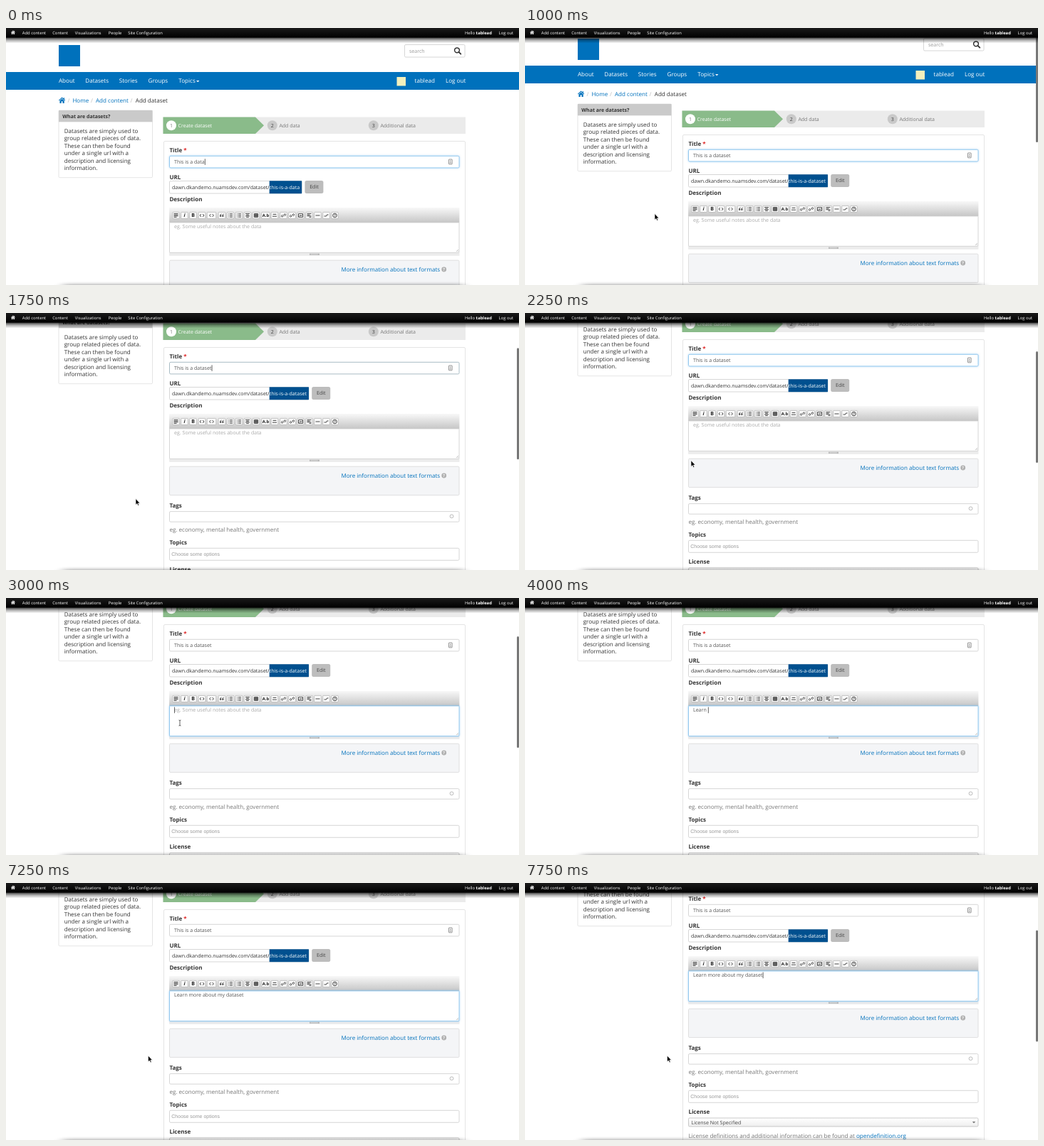
An HTML page that plays this animation: 720x362 px, repeating every 8000 ms.

```html
<!DOCTYPE html>
<html lang="en">
<head>
<meta charset="utf-8">
<title>Add dataset</title>
<style>
html, body { margin: 0; width: 100%; height: 100%; overflow: hidden; background: #fff; }
svg { display: block; width: 100vw; height: 100vh; }
text { font-family: "Open Sans", sans-serif; white-space: pre; text-rendering: geometricPrecision; }
.glow { filter: drop-shadow(0 0 1.6px rgba(102, 175, 233, .5)); }
</style>
</head>
<body>
<svg id="stage" viewBox="0 0 720 362" xmlns="http://www.w3.org/2000/svg"></svg>
<script>
const BLUE = '#0071bc', DARK = '#333', BORDER = '#ccc', GLOW = '#7bbdeb';
const BIG = 8.07, SMALL = 7.05;
const stage = document.getElementById('stage');

const attrs = o => Object.entries(o).map(([k, v]) => ` ${k}="${v}"`).join('');
const rect = (x, y, w, h, fill, more = {}) =>
  `<rect x="${x}" y="${y}" width="${w}" height="${h}" fill="${fill}"${attrs(more)}/>`;
const box = (x, y, w, h, fill = '#fff', stroke = BORDER, more = {}) =>
  rect(x, y, w, h, fill, { stroke, 'stroke-width': 0.8, rx: 1.5, ...more });
const text = (x, y, size, fill, str, more = {}) =>
  `<text x="${x}" y="${y}" font-size="${size}" fill="${fill}"${attrs(more)}>${str}</text>`;
const path = (d, fill = 'none', more = {}) => `<path d="${d}" fill="${fill}"${attrs(more)}/>`;
const circle = (x, y, r, fill, more = {}) =>
  `<circle cx="${x}" cy="${y}" r="${r}" fill="${fill}"${attrs(more)}/>`;
const bold = { 'font-weight': 700 };
const mid = { 'text-anchor': 'middle' };
const label = (y, str) => text(229.4, y, 8, DARK, str, bold);
const house = (x, y, k, fill) =>
  path('M0 4.6L5 0L7.4 2.2V.8H8.7V3.4L10 4.6L9.3 5.3L5 1.5L.7 5.3ZM1.6 5.4L5 2.4L8.4 5.4V9H6V6.2H4V9H1.6Z',
    fill, { transform: `translate(${x} ${y}) scale(${k})` });

function header() {
  const nav = [[74, 'About'], [111.3, 'Datasets'], [158.8, 'Stories'], [199.6, 'Groups'],
    [242.3, 'Topics'], [573.6, 'tablead'], [617, 'Log out']];
  return rect(74, 24, 30, 30, BLUE) +
    box(559.5, 23.5, 84.5, 17.5) +
    text(566, 35, SMALL, '#999', 'search') +
    circle(633, 31.3, 3.4, 'none', { stroke: DARK, 'stroke-width': 1.5 }) +
    path('M635.5 33.8L638.3 36.6', 'none', { stroke: DARK, 'stroke-width': 1.9, 'stroke-linecap': 'round' }) +
    rect(0, 62, 720, 25, BLUE) +
    nav.map(([x, s]) => text(x, 77.4, BIG, '#fff', s)).join('') +
    path('M267 74h4.4l-2.2 2.3Z', '#fff') +
    rect(548.5, 69, 12.5, 12.5, '#f3f0bd');
}

function sidebar() {
  const lines = ['Datasets are simply used to', 'group related pieces of data.',
    'These can then be found', 'under a single url with a', 'description and licensing', 'information.'];
  return house(74, 97.6, 0.92, BLUE) +
    [[86.6, '/'], [119, '/'], [174.4, '/']].map(([x, s]) => text(x, 105.4, 8, '#bbb', s)).join('') +
    text(93.4, 105.4, BIG, BLUE, 'Home') +
    text(126, 105.4, BIG, BLUE, 'Add content') +
    text(181.8, 105.4, BIG, DARK, 'Add dataset') +
    box(74, 116, 131.5, 94.7, '#fff', '#ddd') +
    rect(74, 116, 131.5, 16.3, '#cacaca') +
    text(79.3, 126.6, 7, DARK, 'What are datasets?', bold) +
    lines.map((s, i) => text(81.7, 147.8 + i * 10.5, BIG, DARK, s)).join('');
}

function steps() {
  const step = (x, n, s, disc, num, ink) => circle(x, 137.2, 7, disc) +
    text(x, 139.7, 7, num, n, mid) + text(x + 9.6, 139.9, 7, ink, s);
  return rect(220.5, 125.5, 424.5, 23.5, '#ebebeb') +
    path('M220.5 125.5H350L362 137.2L350 149H220.5Z', '#8abb8a') +
    step(232, 1, 'Create dataset', '#fff', '#777', '#fff') +
    step(373.8, 2, 'Add data', '#c9c9c9', '#444', '#777') +
    step(515.8, 3, 'Additional data', '#c9c9c9', '#444', '#777');
}

function editorBar() {
  const rows = 'M-3-2.4H3M-3-.8H3M-3 .8H3M-3 2.4H1', list = 'M-1.2-2.2H3M-1.2 0H3M-1.2 2.2H3M-3-2.2h.8M-3 0h.8M-3 2.2h.8';
  const angle = 'M-1-2L-3 0L-1 2M1-2L3 0L1 2';
  const quote = 'M-.6-2Q-2.6-1.4-2.5 1.4H-1.2V-.1H-2.2M2.6-2Q.6-1.4 .7 1.4H2V-.1H1';
  const chain = 'M-.4 .9L-1.6 2.1A1.2 1.2 0 0 1-3 .5L-1.4-1M.4-.9L1.6-2.1A1.2 1.2 0 0 1 3-.5L1.4 1M-1 1L1-1';
  const items = [[238.5, rows], [250.5, 0, 'i'], [262.5, 0, 'B'], [275, angle], [288.5, angle, 0, 12.5], [303, quote],
    [315, list], [327, list], [339, 'M-3-2.4H3M-1.8-.8H1.8M-3 .8H3M-1.8 2.4H1.8'],
    [351, 'M-2.6-2.4H2.6V2.4H-2.6ZM-2.6-.8H2.6M-2.6 .8H2.6M-.9-2.4V2.4M.9-2.4V2.4'], [364.5, 0, 'A.b', 11.5],
    [377, 'M-2.4-1.6H2.4M-3 1.2H3'], [389.5, chain], [401.5, chain],
    [413.5, 'M-3-2.4H3V2.4H-3ZM-2 1.4L-.6-.4L.6 1L1.8-.8'], [425.5, 'M-3-2.4H3M-3-.8H1M-3 .8H3M0 2.4H3'],
    [437.5, 'M-3 0H3'], [449.5, 'M-3 1H0L1-1H3'],
    [461.5, 'M2.8 0A2.8 2.8 0 1 1-2.8 0A2.8 2.8 0 1 1 2.8 0M-.8-.8Q0-2 .8-.8L0 .4M0 1.2V1.8']];
  const icon = ([x, d, s, w = 9.6]) => `<g transform="translate(${x} 264)">` +
    rect(-w / 2, -4.6, w, 9.2, '#fafafa', { stroke: '#999', 'stroke-width': 0.5, rx: 1 }) +
    (s ? text(0, 2.4, s === 'A.b' ? 5.8 : 7, '#222', s, { ...mid, ...bold, 'font-style': s === 'i' ? 'italic' : 'normal' })
      : path(d, 'none', { stroke: '#333', 'stroke-width': 0.9 })) + '</g>';
  return rect(229.1, 253, 407.3, 21, 'url(#bar)') + items.map(icon).join('');
}

function form() {
  return box(221.5, 159.5, 423, 500, '#fff', '#ddd') +
    text(229.4, 174.7, 8, DARK, 'Title <tspan fill="#d22">*</tspan>', bold) +
    box(229.5, 180.3, 406.5, 16.6, '#fff', BORDER, { id: 'titleBox' }) +
    text(236, 191.2, SMALL, '#555', '', { id: 'title' }) +
    box(621.5, 185, 4.6, 6.8, '#fff', '#777', { rx: 0.4 }) +
    circle(623.8, 187.4, 0.8, '#888') + rect(622.7, 189.2, 2.2, 1.1, '#888') +
    label(212.6, 'URL') +
    box(229.5, 215.5, 184, 17.5, '#fff', BORDER, { id: 'urlBox' }) +
    text(233, 226.7, SMALL, DARK, 'dawn.dkandemo.nuamsdev.com/dataset/', { id: 'url' }) +
    rect(369, 215.3, 45, 17.9, '#00508f', { id: 'slugBox' }) +
    text(369.2, 226.7, SMALL, '#fff', '', { id: 'slug' }) +
    '<g id="edit">' + box(0, 215.5, 25, 17, '#bdbdbd', '#b4b4b4') +
    text(12.5, 226.4, SMALL, '#444', 'Edit', mid) + '</g>' +
    label(244.2, 'Description') + editorBar() +
    rect(229.1, 316.4, 407.3, 4.4, '#ececec') +
    rect(426, 317.6, 14, 2.4, '#bbb') +
    path('M428 318.8H438', 'none', { stroke: '#eee', 'stroke-width': 1, 'stroke-dasharray': '1 1' }) +
    box(229.5, 274, 406.5, 42.4, '#fff', BORDER, { id: 'descBox', rx: 0.5 }) +
    path('M632 315L635 312M634 315L635 314', 'none', { stroke: '#888', 'stroke-width': 0.5 }) +
    text(236, 282.4, SMALL, '#aaa', '', { id: 'desc' }) +
    rect(0, 0, 0.7, 8.6, '#222', { id: 'caret' }) +
    box(229.5, 327.2, 406.5, 40.4, '#f4f5f7', '#d8d8d8') +
    text(470.4, 343, BIG, BLUE, 'More information about text formats') +
    circle(614.7, 340, 3.4, '#b0b0b0') +
    text(614.7, 342.1, 5.6, '#fff', '?', { ...mid, ...bold }) +
    label(385.2, 'Tags') + box(229.5, 390.6, 406.5, 14.6) +
    circle(625.5, 397.3, 2.4, '#fff', { stroke: '#aaa', 'stroke-width': 0.8 }) +
    text(229.4, 419.2, BIG, '#777', 'eg. economy, mental health, government') +
    label(436.8, 'Topics') + box(229.5, 442.3, 406.5, 17) +
    text(232.3, 453.4, 7, '#999', 'Choose some options', { style: "font-family:'Liberation Sans',sans-serif" }) +
    label(475.1, 'License') + box(229.5, 481, 406.5, 12, 'url(#pick)', '#bbb') +
    text(233.5, 489.5, SMALL, '#444', 'License Not Specified') +
    path('M627.8 486h4.4l-2.2 2.6Z', '#777') +
    text(229.4, 508.6, BIG, '#777', 'License definitions and additional information can be found at ' +
      `<tspan fill="${BLUE}">opendefinition.org</tspan>`);
}

function adminBar() {
  const links = [[22.8, 'Add content'], [65.2, 'Content'], [96.7, 'Visualizations'], [143.7, 'People'],
    [171.2, 'Site Configuration'], [644, 'Hello <tspan font-weight="700">tablead</tspan>'], [691.6, 'Log out']];
  return rect(0, 13, 720, 8.5, 'url(#shade)') + rect(0, 0, 720, 13.6, 'url(#admin)') +
    house(6.9, 3.6, 0.6, '#fff') +
    links.map(([x, s]) => text(x, 9, 5.85, '#fff', s)).join('');
}

const gradient = (id, ...stops) => `<linearGradient id="${id}" x2="0" y2="1">` +
  stops.map(([o, c, a = 1]) => `<stop offset="${o}" stop-color="${c}" stop-opacity="${a}"/>`).join('') + '</linearGradient>';

stage.innerHTML = '<defs>' +
  gradient('bar', [0, '#f8f8f8'], [1, '#c6c6c6']) +
  gradient('pick', [0, '#fff'], [1, '#eee']) +
  gradient('admin', [0, '#1a1a1a'], [1, '#000']) +
  gradient('shade', [0, '#000', 0.8], [0.5, '#000', 0.3], [1, '#000', 0]) +
  '<filter id="soft" x="-10%" y="-200%" width="120%" height="500%"><feGaussianBlur stdDeviation="7 2.2"/></filter></defs>' +
  rect(0, 0, 720, 362, '#fff') +
  '<g id="page">' + header() + sidebar() + steps() + form() + '</g>' +
  rect(80, 361, 562, 7, '#000', { filter: 'url(#soft)', opacity: 0.35 }) +
  rect(717, 0, 3, 157, '#777', { id: 'thumb', rx: 1.5 }) +
  adminBar() +
  path('M0 0V8.6L2 6.8L3.3 9.7L4.7 9.1L3.4 6.3H6Z', '#000', { id: 'arrow', stroke: '#fff', 'stroke-width': 0.6 }) +
  path('M-1.5-4Q0-4 0-3V3Q0 4-1.5 4M1.5-4Q0-4 0-3M0 3Q0 4 1.5 4', 'none', { id: 'beam', stroke: '#222', 'stroke-width': 0.7 });

const $ = Object.fromEntries([...stage.querySelectorAll('[id]')].map(e => [e.id, e]));
const set = (el, o) => { for (const k in o) el.setAttribute(k, o[k]); };
const show = (el, on) => set(el, { visibility: on ? 'visible' : 'hidden' });
const place = (el, x, y) => set(el, { transform: `translate(${x} ${y})` });
const width = el => el.getComputedTextLength();

// Values of the last key at or before t; each key is [time, ...values].
const hold = (keys, t) => keys.filter(k => k[0] <= t).pop().slice(1);

const SCROLL = [[0, 0], [1000, 9], [1250, 41], [1500, 86], [1750, 111], [2000, 120], [2250, 122], [7500, 135], [7750, 150]];
const POINTER = [[0, ''], [1000, 'arrow', 182, 261.6], [2000, 'arrow', 212, 230], [2250, 'arrow', 233, 207.8],
  [2750, 'beam', 244, 176], [3500, ''], [6750, 'beam', 244, 188], [7000, 'arrow', 206, 236], [7250, 'arrow', 199.5, 243.2]];
const TITLE = 'This is a dataset', NOTE = 'Learn more about my dataset';

function draw(now) {
  const t = Math.floor(now % 8000 / 250) * 250;
  const [scroll] = hold(SCROLL, t);
  const inDesc = t >= 3000;

  place($.page, 0, -scroll);
  set($.thumb, { y: scroll * 0.443 });
  show($.thumb, t >= 1000 && t < 3250 || t >= 7500);

  const title = TITLE.slice(0, 14 + Math.min(3, t / 250 * 1.5));
  $.title.textContent = title;
  $.slug.textContent = title.toLowerCase().replace(/ /g, '-');
  const left = 233 + width($.url), end = left + width($.slug) + 3;
  set($.slug, { x: left });
  set($.slugBox, { x: left, width: end - left });
  set($.urlBox, { width: end - 229.5 });
  place($.edit, end + 4.8, 0);

  const count = Math.max(0, Math.min(NOTE.length, Math.floor((t - 3400) / 100)));
  $.desc.textContent = count ? NOTE.slice(0, count) : 'eg. Some useful notes about the data';
  set($.desc, { fill: count ? '#555' : '#aaa' });

  const dim = t >= 1250 && t < 2000;
  set($.titleBox, { stroke: inDesc ? BORDER : dim ? '#93abb5' : GLOW, class: inDesc || dim ? '' : 'glow' });
  set($.descBox, { stroke: inDesc ? GLOW : BORDER, class: inDesc ? 'glow' : '' });

  const typing = t <= 500 || inDesc && t < 6000;
  show($.caret, typing || Math.floor((t - 1500) / 500) % 2 === 0);
  const caretX = inDesc ? (count ? width($.desc) : 0) : width($.title);
  set($.caret, { x: 236.3 + caretX, y: inDesc ? 275.6 : 184.3 });

  const [kind, x, y] = hold(POINTER, t);
  for (const k of ['arrow', 'beam']) {
    show($[k], k === kind);
    if (k === kind) place($[k], x, y);
  }
}

function tick(now) {
  draw(now);
  requestAnimationFrame(tick);
}
draw(0);
requestAnimationFrame(tick);
</script>
</body>
</html>
```
